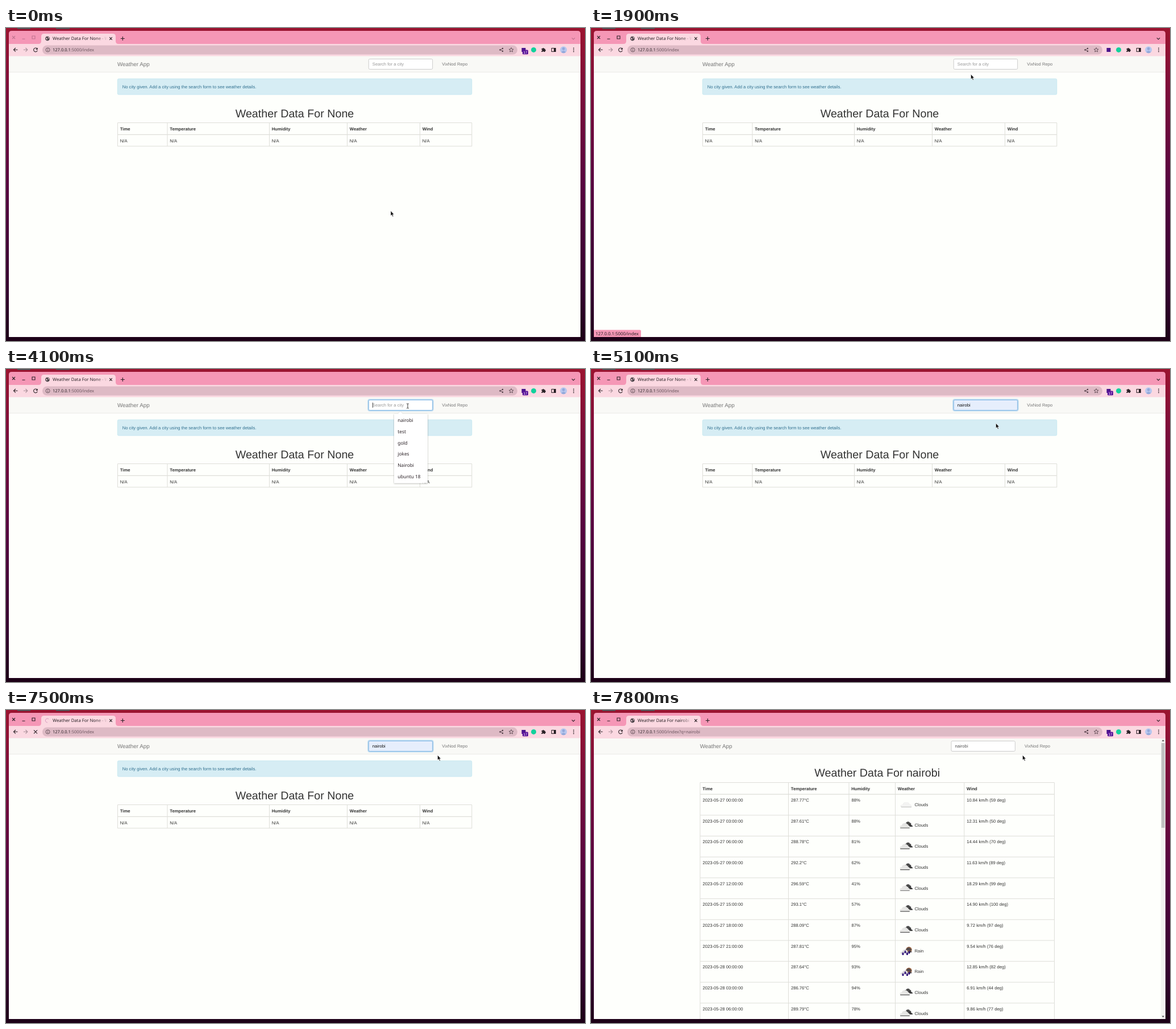
These frames come from a looping animation (1019x550 px, 8000 ms). An HTML page:

```html
<!DOCTYPE html>
<html lang="en">
<head>
<meta charset="utf-8">
<title>Weather App</title>
<style>
  html, body { margin: 0; width: 100%; height: 100%; overflow: hidden; background: #1c0016; }
  svg { display: block; width: 1019px; height: 550px; }
  text { font: 7.66px "Liberation Sans", Arial, sans-serif; fill: #333; white-space: pre; text-rendering: geometricPrecision; }
  .ui { font: 7.5px "Noto Sans", "Open Sans", sans-serif; fill: #2b2227; }
  .b { font-weight: bold; }
  .line { fill: none; stroke: #2b2227; stroke-width: 1.1; }
  .grid { fill: none; stroke: #deded9; }
  .blur .line { stroke: #c0728f; }
</style>
</head>
<body>
<svg id="stage" viewBox="0 0 1019 550" xmlns="http://www.w3.org/2000/svg"></svg>
<script>
const LOOP = 8000, STEP = 100;
const PINK = '#f597b6', BAR = '#fbd8e1', PAGE = '#fefffc';

const text = (x, y, s, attrs = '') => `<text x="${x}" y="${y}" ${attrs}>${s}</text>`;
const rect = (x, y, w, h, fill, attrs = '') =>
  `<rect x="${x}" y="${y}" width="${w}" height="${h}" fill="${fill}" ${attrs}/>`;
const circle = (x, y, r, fill, attrs = '') => `<circle cx="${x}" cy="${y}" r="${r}" fill="${fill}" ${attrs}/>`;
const path = (d, attrs = 'class="line"') => `<path d="${d}" ${attrs}/>`;
const group = (id, body, attrs = '') => `<g id="${id}" ${attrs}>${body}</g>`;

function desktop() {
  return rect(0, 0, 1019, 550, 'url(#wall)') +
    rect(20, 0, 23, 1.5, '#41605f') + rect(88, 0, 24, 1.5, '#41605f') +
    path('M5 543V10Q5 5 10 5H1006Q1011 5 1011 10V543Z', `fill="${PINK}"`);
}

function tabStrip() {
  const controls = path('M11 14L16 19M16 14L11 19M28.5 19.2H33.5M46 14H51V19H46Z') +
    path('M995.8 17.3L998.5 20L1001.2 17.3');
  const title = (id, name) =>
    group(id, text(82, 21.3, `Weather Data For ${name} - Weather App`, 'class="ui" style="font-size:7.7px" clip-path="url(#titleClip)"'));
  const globe = circle(73, 18.6, 3.8, '#4d454b') +
    path('M70.3 17.2Q72 17 72.6 18.6T71.2 20.4ZM73.6 15.6Q75.8 16 76 18.4Q74 18.6 73.6 15.6ZM73.4 21.4L75 20', `fill="${BAR}"`);
  return group('controls', controls) +
    path('M57 28Q62 28 62 23V15Q62 10 67 10H188Q193 10 193 15V23Q193 28 198 28Z', `fill="${BAR}"`) +
    group('globe', globe) +
    group('spinner', path('M75.2 15.9A3.5 3.5 0 1 0 73 22', 'fill="none" stroke="#d79abf" stroke-width="1"')) +
    title('titleNone', 'None') + title('titleCity', 'nairobi') +
    rect(158, 12, 21, 14, 'url(#fade)') +
    path('M182.2 16.2L186.8 20.8M186.8 16.2L182.2 20.8M205.3 15V22M201.8 18.5H208.8');
}

function toolbar() {
  const url = (id, tail) =>
    group(id, text(82, 41.2, `127.0.0.1<tspan fill="#6d5660">:5000/index${tail}</tspan>`, 'class="ui"'));
  const badge = (id, n) => group(id, rect(909, 38.5, 10, 7.8, '#5a1399', 'rx="1.5"') +
    text(914, 44.9, n, 'text-anchor="middle" style="font-size:6.2px;fill:#fff"'));
  return rect(5, 28, 1006, 21.5, BAR) +
    path('M20.5 38.3H13.5M16.8 35L13.5 38.3L16.8 41.6') +
    path('M30.8 38.3H37.8M34.5 35L37.8 38.3L34.5 41.6', 'class="line" style="stroke:#a78d97"') +
    group('reload', path('M54.6 36.2A3.4 3.4 0 1 0 55.3 39.4') + path('M55.7 34.4V37.9H52.2Z', 'fill="#2b2227"')) +
    group('stop', path('M49 35.4L55 41.4M55 35.4L49 41.4')) +
    rect(64, 30.5, 836, 16, '#debac5', 'rx="8"') +
    circle(73.6, 38.4, 3.5, 'none', 'stroke="#4d3a43" stroke-width=".8"') +
    path('M73.6 37.8V40.4M73.6 36.2V37', 'stroke="#4d3a43" stroke-width=".9"') +
    url('urlPlain', '') + url('urlCity', '?q=nairobi') +
    path('M874 36.2L869.5 38.4L874 40.7', 'fill="none" stroke="#4d3a43" stroke-width=".8"') +
    circle(874, 36, 1.2, '#4d3a43') + circle(869.5, 38.4, 1.2, '#4d3a43') + circle(874, 40.8, 1.2, '#4d3a43') +
    path('M889.2 34.5L890.3 37.1L893.1 37.3L891 39.2L891.6 41.9L889.2 40.4L886.8 41.9L887.4 39.2L885.3 37.3L888.1 37.1Z',
      'fill="none" stroke="#4d3a43" stroke-width=".8"') +
    rect(907.5, 35, 7, 7, '#4a148c') + badge('badge17', 17) + badge('badge16', 16) +
    circle(928.6, 38.4, 4.5, '#12d19c') +
    path('M942.4 36.2H944.2A1.3 1.3 0 1 1 946.8 36.2H948.7V38A1.3 1.3 0 1 1 948.7 40.6V42H946.7A1.3 1.3 0 0 0 944.2 42H942.4V40.2A1.2 1.2 0 0 0 942.4 37.8Z', 'fill="#2b2227"') +
    path('M960.3 35.5H967.3V41.5H960.3Z') + rect(964, 35.5, 3.3, 6, '#2b2227') +
    circle(981.2, 38.3, 6, '#b8c7ee') + circle(981.2, 36.5, 2.4, '#93a8da') +
    path('M977.2 42.6Q981.2 37.6 985.2 42.6Q981.2 46 977.2 42.6Z', 'fill="#93a8da"') +
    [35.4, 38.4, 41.4].map(y => circle(999, y, .9, '#2b2227')).join('');
}

// Page header; dx shifts it when the scrollbar takes room.
function navbar(dx, right) {
  return rect(5, 49.5, 1006, 493.5, PAGE) +
    rect(5, 49.5, right - 5, 28, '#f9f9f6') + rect(5, 77, right - 5, .8, '#e7e7e4') +
    text(196 + dx, 67, 'Weather App', `class="brand" style="font-size:9.85px;fill:#777"`) +
    text(767.3 + dx, 66.3, 'VixNod Repo', 'style="fill:#777"') +
    rect(638.3 + dx, 54.5, 112.4, 18, '#fff', 'rx="2" stroke="#ccc"');
}

function table(cols, top, head, bottom, names) {
  const [left, right] = [cols[0], cols[cols.length - 1]];
  return path(`M${left} ${top}H${right}` + cols.map(x => `M${x} ${top}V${bottom}`).join(''), 'class="grid"') +
    path(`M${left} ${head}H${right}`, 'class="grid" stroke-width="1.3"') +
    names.map((s, i) => text(cols[i] + 4.3, head - 7.5, s, 'class="b"')).join('');
}

const HEADS = ['Time', 'Temperature', 'Humidity', 'Weather', 'Wind'];
const title = (x, y, s) => text(x, y, s, 'text-anchor="middle" style="font-size:19.7px"');

function emptyPage() {
  const cols = [196.5, 284, 463.5, 600.5, 728.5, 819.8];
  return navbar(0, 1011) +
    rect(196.4, 89.2, 623.4, 27.8, '#d6edf4', 'rx="2" stroke="#c0e6ef" stroke-width=".8"') +
    text(204.7, 105.8, 'No city given. Add a city using the search form to see weather details.', 'style="fill:#31708f"') +
    title(508, 156.7, 'Weather Data For None') +
    table(cols, 166.5, 187.3, 208, HEADS) + path('M196.5 207.7H819.8', 'class="grid"') +
    cols.slice(0, 5).map(x => text(x + 4.3, 200.7, 'N/A')).join('');
}

function cloud(x, y, fill, k = 1) {
  return path('M-9 4Q-11 0 -6 0Q-5 -5 0 -4Q4 -5 5 -1Q10 0 9 4Z',
    `transform="translate(${x} ${y}) scale(${k})" fill="${fill}"`);
}

function weatherIcon(kind, y) {
  if (kind === 'few') return cloud(555, y + .7, '#a9a9a9') + cloud(555, y, '#f3f3f2');
  const front = rect(544, y + 3.7, 17, 1.4, '#555', 'rx=".7"') + cloud(552.5, y + .2, '#e6e6e4', .93);
  if (kind === 'Clouds') return cloud(558, y - 4, '#4a4a4a', .6) + cloud(561, y, '#393939', .55) + front;
  const drop = (x, dy) => path(`M${x} ${y + dy - 3}Q${x + 3.4} ${y + dy + 2.4} ${x} ${y + dy + 2.4}T${x} ${y + dy - 3}Z`, 'fill="#2d0f78"');
  return circle(559.5, y - 1.5, 5.2, '#9b6745') + cloud(559, y - 3, '#534a49', .55) +
    cloud(553, y + 2, '#d9d7da', .85) + cloud(561, y + 1.5, '#4b4548', .4) +
    drop(549, 5.5) + drop(553, 2.2) + drop(556.5, 5.5) + drop(560, 3);
}

function cityPage() {
  const cols = [192, 347.5, 454, 535.5, 656.8, 815.5], pitch = 36.68;
  const temps = '287.77 287.61 288.78 292.2 296.59 293.1 288.09 287.81 287.64 286.76 289.79'.split(' ');
  const humid = '88 88 81 62 41 57 87 95 93 94 78'.split(' ');
  const winds = '10.84/59 12.31/50 14.44/70 11.63/89 18.29/99 14.90/100 9.72/97 9.54/76 12.85/82 6.91/44 9.86/77'.split(' ');
  let rows = '', icons = '';
  temps.forEach((temp, i) => {
    const y = 161 + i * pitch, sky = i === 7 || i === 8 ? 'Rain' : 'Clouds';
    const when = new Date(Date.UTC(2023, 4, 27, i * 3)).toISOString().slice(0, 19).replace('T', ' ');
    const [speed, deg] = winds[i].split('/');
    [when, `${temp}°C`, `${humid[i]}%`, , `${speed} km/h (${deg} deg)`]
      .forEach((s, c) => rows += text(cols[c] + 4.4, y, s));
    rows += text(569.6, y + 7.8, sky) + path(`M192 ${148.2 + (i + 1) * pitch}H815.5`, 'class="grid"');
    icons += weatherIcon(i ? sky : 'few', y + 5);
  });
  return navbar(-4.3, 1003) + text(640.6, 66.3, 'nairobi', 'style="fill:#555"') +
    title(503.7, 117.2, 'Weather Data For nairobi') +
    table(cols, 127.5, 148.2, 543, HEADS) + rows + group('icons', icons) +
    rect(1002.8, 49.5, 8.2, 493.5, '#f3f3f1') + rect(1003.8, 58, 6, 149, '#c1c1c1') +
    path('M1004.6 55L1006.8 52.3L1009 55Z', 'fill="#555"') + path('M1004.6 537.5L1006.8 540.2L1009 537.5Z', 'fill="#555"');
}

function searchBox() {
  const words = ['nairobi', 'test', 'gold', 'jokes', 'Nairobi', 'ubuntu 18'];
  const field = fill => rect(638.3, 54.5, 112.4, 18, fill, 'rx="2" stroke="#7fb7e6"');
  return group('glow', rect(637.3, 53.5, 114.4, 20, 'none', 'rx="3" stroke="#66afe9" stroke-opacity=".4" stroke-width="2"')) +
    group('focus', field('#fff')) + group('filled', field('#e6eefc')) +
    group('hint', text(644.8, 66.3, 'Search for a city', 'style="fill:#999"')) +
    group('typed', text(644.8, 66.3, 'nairobi', 'style="fill:#111"')) +
    group('caretStart', rect(645, 59, .8, 9, '#222')) +
    group('caretEnd', rect(668.2, 59, .8, 9, '#222')) +
    group('menu',
      path('M683 79H689.5L694 75L698.5 79H742V200.5H683Z', 'fill="#fff" filter="url(#shadow)"') +
      group('hover', rect(683, 80, 59, 20, '#e8e8e8')) +
      words.map((w, i) => text(689.3, 93 + i * 19.75, w, 'class="ui" style="font-size:8.3px"')).join(''));
}

function bubble() {
  return path('M5 530.5H86Q88 530.5 88 532.5V543H5Z', `fill="${PINK}"`) +
    text(8, 539.7, '127.0.0.1:5000/index', 'class="ui" style="font-size:7.8px"');
}

const pointers =
  group('arrow', path('M.5 .3V9L2.4 7.3L4 10.6L5.4 9.9L3.9 6.8H6.6Z', 'fill="#111" stroke="#fff" stroke-width=".6"')) +
  group('beam', path('M-2 -4H-.6L0 -3.4L.6 -4H2M0 -3.4V3.4M-2 4H-.6L0 3.4L.6 4H2', 'fill="none" stroke="#222" stroke-width=".9"')) +
  group('hand', path('M-1 0Q0 -1 1 0V3.5L4 4.2Q5 4.6 4.7 6L4 10H-.8L-3.2 6.4Q-3 5 -1 6.2Z', 'fill="#fff" stroke="#111" stroke-width=".9"'));

const stage = document.getElementById('stage');
stage.innerHTML = `<defs>
  <linearGradient id="wall" x2="0" y2="1">
    <stop stop-color="#9b1430"/><stop offset=".2" stop-color="#7c0d3a"/><stop offset=".5" stop-color="#570440"/>
    <stop offset=".85" stop-color="#33022e"/><stop offset="1" stop-color="#1c0016"/>
  </linearGradient>
  <linearGradient id="fade"><stop stop-color="${BAR}" stop-opacity="0"/><stop offset="1" stop-color="${BAR}"/></linearGradient>
  <clipPath id="titleClip"><rect x="80" y="10" width="97" height="18"/></clipPath>
  <clipPath id="view"><rect x="5" y="49.5" width="1006" height="493.5"/></clipPath>
  <filter id="shadow"><feDropShadow dx="0" dy=".8" stdDeviation="1.1" flood-opacity=".35"/></filter>
</defs>` + desktop() + tabStrip() + toolbar() +
  group('empty', emptyPage() + searchBox()) +
  group('city', cityPage(), 'clip-path="url(#view)"') +
  group('bubble', bubble()) + group('cursor', pointers);

const $ = id => document.getElementById(id);

// Visible spans in ms: start, end, start, end...
const SPANS = {
  empty: [0, 7700], city: [7700, LOOP], icons: [7800, LOOP],
  titleNone: [0, 7700], titleCity: [7700, LOOP], urlPlain: [0, 7700], urlCity: [7700, LOOP],
  globe: [0, 1300, 1700, 6900, 7800, LOOP], spinner: [1300, 1700, 6900, 7800],
  reload: [0, 1300, 1700, 6900, 7800, LOOP], stop: [1300, 1700, 6900, 7800],
  badge17: [0, 1300, 3400, LOOP], badge16: [2400, 3400], bubble: [1200, 2100],
  focus: [2800, 4600], glow: [2800, 7700], filled: [4600, 7700],
  hint: [0, 4600], typed: [4600, 7700],
  caretStart: [2800, 3300, 4100, 4600], caretEnd: [5300, 5800, 6400, 6900],
  menu: [2800, 4900], hover: [4600, 4900],
  arrow: [0, 1000, 1700, 2100, 4600, LOOP], hand: [1000, 1700], beam: [2100, 4600]
};

// Pointer stops: time, x, y.
const MOVES = [
  [0, 676.5, 321], [400, 610, 262], [500, 420, 140], [600, 218, 33],
  [800, 94, 8], [900, 160, 42], [1000, 230, 73],
  [1700, 340, 76], [1800, 520, 79], [1900, 668, 81], [2000, 684, 76], [2100, 698, 70], [2200, 707, 65],
  [4600, 706, 84], [4700, 704, 98], [5000, 705, 97], [5100, 712, 95], [5200, 724, 92],
  [5300, 738, 88], [5400, 748, 84], [5500, 755, 81], [5600, 758, 80], [5800, 759, 79]
];

const inSpan = (t, s) => s.some((from, i) => i % 2 === 0 && t >= from && t < s[i + 1]);

function draw(t) {
  for (const id in SPANS) $(id).style.display = inSpan(t, SPANS[id]) ? '' : 'none';
  const [, x, y] = MOVES.filter(m => m[0] <= t).pop();
  $('cursor').setAttribute('transform', `translate(${x} ${y})`);
  $('controls').setAttribute('class', t < 100 ? 'blur' : '');
  $('glow').style.opacity = t < 2900 ? .5 : 1;
  $('spinner').setAttribute('transform', `rotate(${(t - 7500) * .45} 73 18.5)`);
  document.querySelector('#empty .brand').style.fill = inSpan(t, [1000, 1700]) ? '#5e5e5e' : '#777';
}

const start = performance.now();
let last = -1;
function tick(now) {
  const t = Math.floor(Math.max(0, now - start) % LOOP / STEP) * STEP;
  if (t !== last) draw(last = t);
  requestAnimationFrame(tick);
}
draw(0);
requestAnimationFrame(tick);
</script>
</body>
</html>
```
